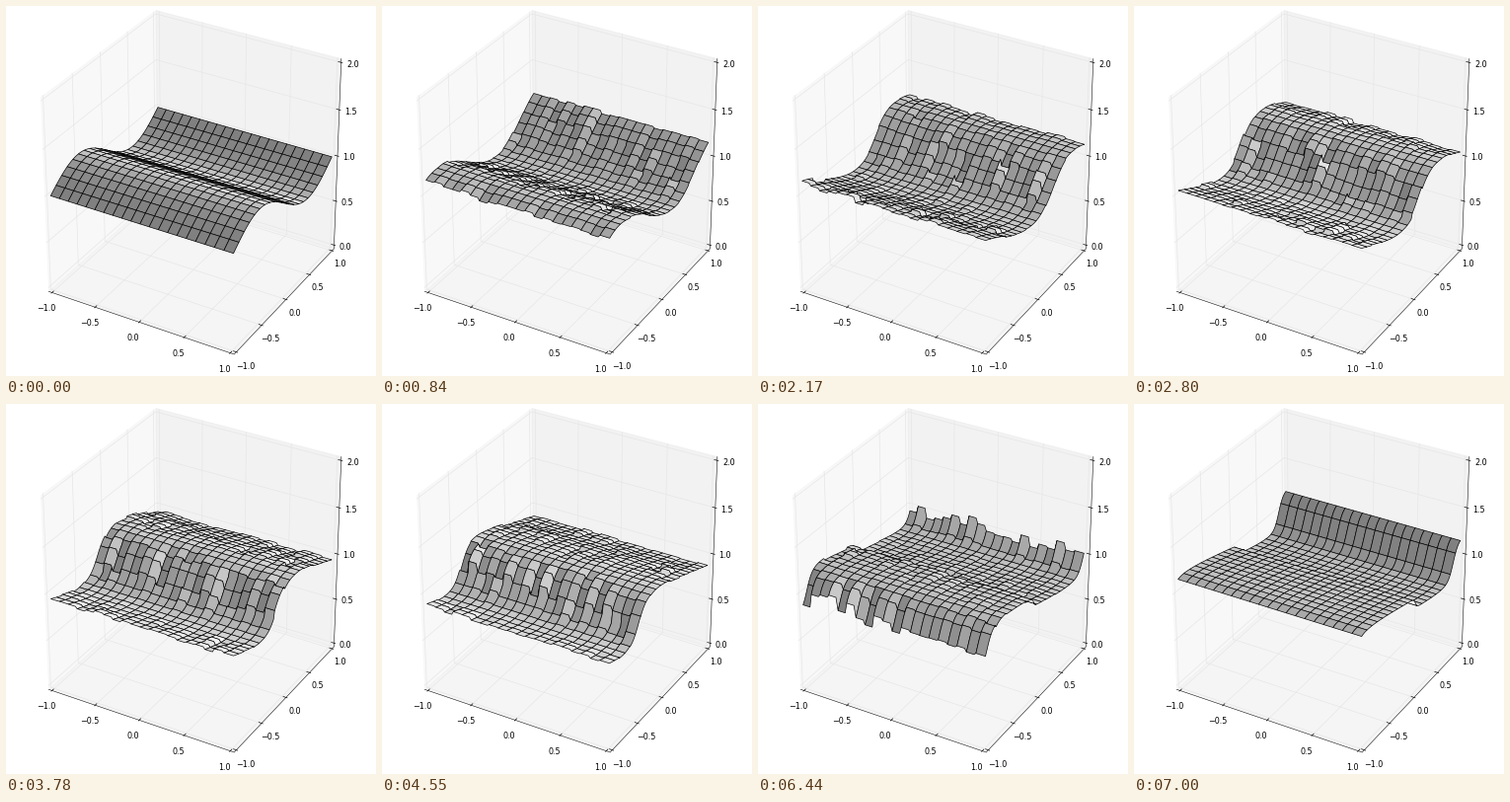
Write a matplotlib script that moves like this. It is 375x375 px and loops after 7420 ms.

```python
import numpy as np
import matplotlib.pyplot as plt
from matplotlib.animation import FuncAnimation
from matplotlib.collections import LineCollection, PolyCollection

SIZE, DPI = 375, 48
FRAMES, LAST, STEP_MS = 106, 100, 70
N, STRIDE = 101, 5
SUB, DT = 4, 0.0214 / 4          # solver steps per frame and their length
EDGE = 0.5 + 1 / 48              # half size of the box around the unit cube
TICK_IN, TICK_OUT = EDGE - 1 / 60, EDGE + 1 / 120
LABEL = 0.575

# Camera at elevation 30, azimuth -60, distance 10
EYE = np.array([0.4330, -0.75, 0.5])
RIGHT = np.array([0.8660, 0.5, 0.0])
UP = np.array([-0.25, 0.4330, 0.8660])


def project(p):
    """Map centred cube coordinates to stage pixels and depth."""
    p = np.asarray(p, float)
    depth = 10 - p @ EYE
    px = 190 + 2086 * (p @ RIGHT) / depth
    py = 172.3 - 2160 * (p @ UP) / depth
    return np.stack([px, py], axis=-1), depth


def solve_wave():
    """Upwind solution of u_t = (u^2 / 2)_y on a periodic line."""
    y = np.linspace(-1, 1, N)[:-1]
    u = 1 - 0.2 * np.sin(np.pi * y)
    rows = [u]
    for _ in range(SUB * LAST + 40):
        flux = u * u / 2
        u = u + DT / 0.02 * (np.roll(flux, -1) - flux)
        rows.append(u)
    rows = np.array(rows)
    return np.hstack([rows, rows[:, :1]])


axis = np.linspace(-1, 1, N)
X, Y = np.meshgrid(axis, axis, indexing="ij")
history = solve_wave()

# Each block of the grid runs a little ahead of or behind the clock
rng = np.random.default_rng(12)
blocks = (20, 10)
phase = rng.uniform(0, 2 * np.pi, blocks)
rate = rng.uniform(0.1, 0.4, blocks)
strength = rng.uniform(4, 15, blocks)
bx = np.minimum(np.arange(N) // 5, 19)
by = np.minimum(np.arange(N) // 10, 9)
cols = np.arange(N)[None, :]


def heights(k):
    env = max(0, min(1, k / 14, (LAST - k) / 4))
    lag = env * strength * np.sin(rate * k + phase) ** 3
    s = np.clip(SUB * k - lag[bx][:, by], 0, len(history) - 2)
    i = s.astype(int)
    w = s - i
    z = (1 - w) * history[i, cols] + w * history[i + 1, cols]
    # Small standing step near the middle late in the run
    amp = 0.1 * np.clip((k - 70) / 22, 0, 1)
    p = (Y - 0.06 - 0.015 * (k - LAST) + 1) % 2 - 1
    return z + amp * (p - np.tanh(p / 0.035)) / 2


def cell_rings():
    """Outline of every cell as flat indices into the grid."""
    m = np.arange(STRIDE)
    zero, full = 0 * m, 0 * m + STRIDE
    dr = np.concatenate([zero, m, full, STRIDE - m])
    dc = np.concatenate([m, full, STRIDE - m, zero])
    starts = np.arange(0, N - 1, STRIDE)
    r, c = np.meshgrid(starts, starts, indexing="ij")
    return (r.reshape(-1, 1) + dr) * N + c.reshape(-1, 1) + dc


rings = cell_rings()


def surface(k):
    z = heights(k)
    pts = np.stack([X, Y, z], axis=-1).reshape(-1, 3)
    xy, depth = project(np.stack([X / 2, Y / 2, (z - 1) / 2], axis=-1).reshape(-1, 3))

    a, b, c = (pts[rings[:, i]] for i in (0, 7, 14))
    normal = np.cross(a - b, b - c)
    normal /= np.linalg.norm(normal, axis=1, keepdims=True)
    shade = normal @ np.array([-1, -1, 0.5])
    shade = 0.5 + 0.5 * (shade - shade.min()) / np.ptp(shade)

    order = np.argsort(-depth[rings].mean(axis=1))
    return xy[rings[order]], np.repeat(shade[order, None], 3, axis=1)


fig = plt.figure(figsize=(SIZE / DPI, SIZE / DPI), dpi=DPI, facecolor="white")
ax = fig.add_axes([0, 0, 1, 1])
ax.set_xlim(0, SIZE)
ax.set_ylim(SIZE, 0)
ax.axis("off")


def lines(segments, color, width, z):
    xy = [project(s)[0] for s in segments]
    ax.add_collection(LineCollection(xy, colors=color, linewidths=width, zorder=z), autolim=False)


def draw_box():
    e = EDGE
    panes = [
        ([(-e, -e, -e), (-e, e, -e), (-e, e, e), (-e, -e, e)], 0.95),
        ([(-e, e, -e), (e, e, -e), (e, e, e), (-e, e, e)], 0.90),
        ([(-e, -e, -e), (e, -e, -e), (e, e, -e), (-e, e, -e)], 0.925),
    ]
    for corners, g in panes:
        color = (g, g, g, 0.5)
        ax.add_collection(PolyCollection([project(corners)[0]], facecolors=[color],
                                         edgecolors=[color], linewidths=1, zorder=1),
                          autolim=False)

    grid, ticks = [], []
    for t in np.linspace(-0.5, 0.5, 5):
        grid += [
            [(t, e, e), (t, e, -e), (t, -e, -e)],
            [(-e, t, e), (-e, t, -e), (e, t, -e)],
            [(-e, -e, t), (-e, e, t), (e, e, t)],
        ]
        ticks += [
            [(t, -TICK_OUT, -e), (t, -TICK_IN, -e)],
            [(TICK_OUT, t, -e), (TICK_IN, t, -e)],
            [(TICK_OUT, e, t), (TICK_IN, e, t)],
        ]
        side = f"{2 * t:.1f}".replace("-", "\u2212")
        label((t, -LABEL, -LABEL), side, 0, 1)
        label((LABEL, t, -LABEL), side, -1, 1)
        label((LABEL, LABEL, t), f"{2 * t + 1:.1f}", -3.5, 4)
    lines(grid, (0.9, 0.9, 0.9), 1, 2)
    lines([[(-e, -e, -e), (e, -e, -e), (e, e, -e), (e, e, e)]], "black", 0.75, 3)
    lines(ticks, "black", 1, 3)


def label(p, text, dx, dy):
    x, y = project(p)[0]
    ax.text(x + dx, y + dy, text, fontsize=12, family="DejaVu Sans",
            ha="center", va="center", zorder=6)


draw_box()
verts, faces = surface(0)
sheet = PolyCollection(verts, facecolors=faces, edgecolors="black", linewidths=1, zorder=5)
ax.add_collection(sheet, autolim=False)


def update(frame):
    verts, faces = surface(min(frame, LAST))
    sheet.set_verts(verts)
    sheet.set_facecolor(faces)
    return (sheet,)


anim = FuncAnimation(fig, update, frames=FRAMES, interval=STEP_MS, repeat=True, repeat_delay=0)
plt.show()
```
